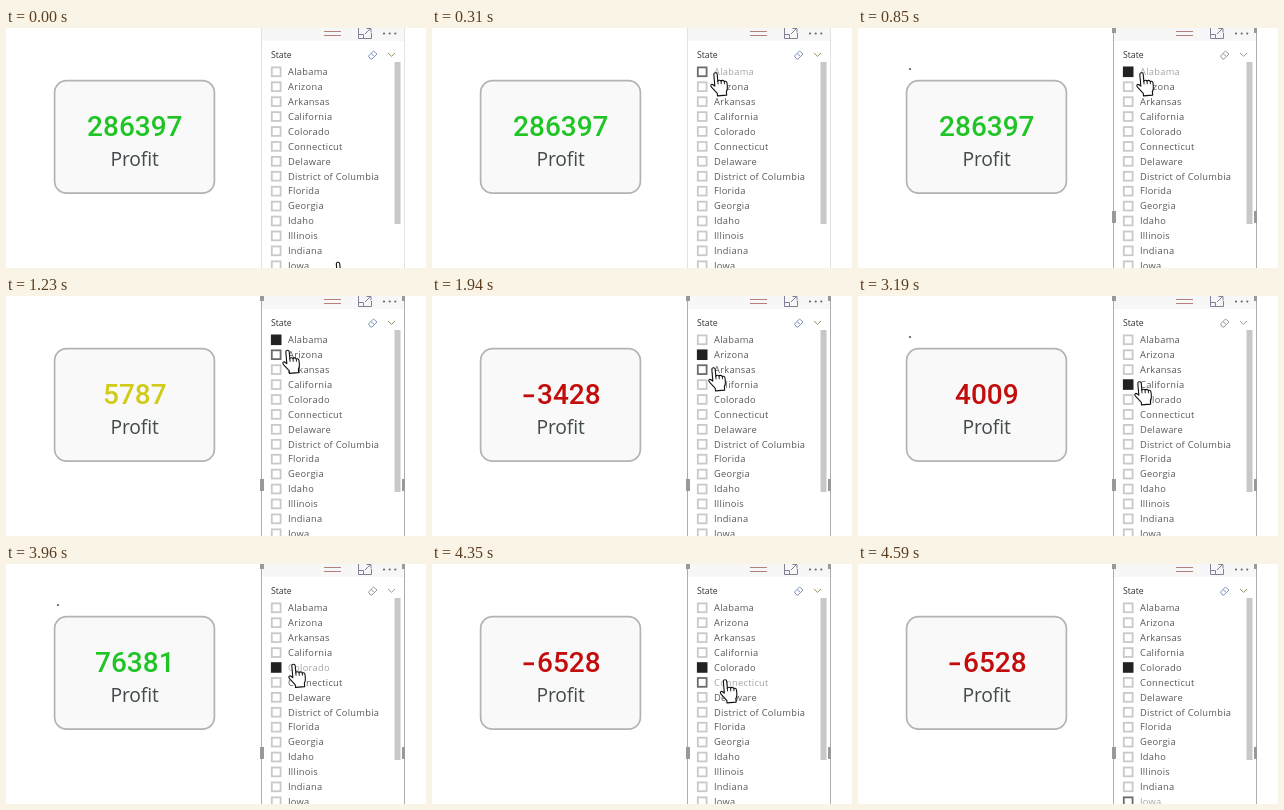
Recreate the animation shown at these times as an HTML page. Size 420 by 240 pixels, loop 4.83 s.

```html
<!DOCTYPE html>
<html lang="en">
<head>
<meta charset="utf-8">
<title>Profit by state</title>
<style>
  html, body { margin: 0; width: 100%; height: 100%; overflow: hidden; background: #fff; }
  svg { display: block; width: 420px; height: 240px; }
  text { font-family: "Open Sans", "Noto Sans", sans-serif; }
  .value { font: 500 28px Roboto, sans-serif; text-anchor: middle; }
  .label { font-size: 19.3px; letter-spacing: -.15px; fill: #434b4c; text-anchor: middle; }
  .title { font-size: 8.7px; fill: #333; }
  .row text { font-size: 9.3px; letter-spacing: .28px; fill: #585858; }
  .row rect { fill: #fff; stroke: #c9c9c9; stroke-width: 1.8; }
  .row.hover rect { stroke: #6c6c6c; }
  .row.checked rect { fill: #222; stroke: #222; }
  .row.muted text { fill: #a5a5a5; }
  .frame { stroke: #e2e2e2; }
  .selected .frame { stroke: #adadad; }
  .handles { fill: #999; visibility: hidden; }
  .selected .handles { visibility: visible; }
  .eraser { stroke: #7f97bd; }
  .chevron { stroke: #929262; }
  .busy .eraser, .busy .chevron { stroke: #999; }
  .spinner { fill: #555; visibility: hidden; }
  .busy .spinner { visibility: visible; }
</style>
</head>
<body>
<svg id="stage" viewBox="0 0 420 240">
  <circle class="spinner" cx="52" cy="41" r="1.1"/>
  <rect x="48.6" y="52.6" width="159.8" height="112.6" rx="12" fill="#f9f9f9" stroke="#b3b3b3" stroke-width="1.7"/>
  <g id="amount">
    <rect id="minus" x="91.5" y="98.4" width="10.5" height="2.8"/>
    <text id="digits" class="value" y="108"></text>
  </g>
  <text class="label" x="128.6" y="138">Profit</text>

  <rect x="256" width="143" height="13" fill="#f7f7f7"/>
  <path class="frame" d="M255.5 0V240M398.5 0V240"/>
  <path class="handles" d="M254 0h4v5h-4zM396 0h3v5h-3zM254 183h4v12h-4zM396 183h3v12h-3z"/>
  <path d="M318 3.5h17M318 7.5h17" stroke="#b57f7b"/>
  <path d="M352.5 0V10.5H365.5V5M352.5 6.5h5v4M359 6l5.5-5.5M360.5 .5h4.5v4" fill="none" stroke="#80809a"/>
  <g fill="#666"><circle cx="378" cy="5.5" r="1.1"/><circle cx="383.7" cy="5.5" r="1.1"/><circle cx="389.3" cy="5.5" r="1.1"/></g>
  <text class="title" x="265" y="30">State</text>
  <path class="eraser" d="M362.5 28l5-5 3.5 3-5 5h-1.5zM365 25.5l3.5 3" fill="none"/>
  <path class="chevron" d="M382 25l3.5 3.3 3.5-3.3" fill="none"/>
  <g id="rows"></g>
  <rect x="388.5" y="34" width="6" height="162" fill="#c8c8c8"/>
  <g id="cursor" stroke="#111" stroke-width="1.1" stroke-linejoin="round">
    <path fill="#fff" d="M-1.8 13V1.5a1.7 1.7 0 0 1 3.4 0V8.5q0-1 1.6-1t1.6 1.2q.4-.9 1.7-.7t1.5 1.4q.4-.6 1.4-.3 1.2.4 1.2 1.8V15q0 2.5-1.4 4.5V23H0V20.5L-5 14q-1.4-2-.2-2.8 1.2-.7 3.4 1.8z"/>
    <path d="M1.6 8v3.5M4.8 8.7v3M8 9.4v2.5" stroke-width=".9"/>
  </g>
</svg>
<script>
const LOOP = 4830, ROW_STEP = 14.92, FIRST_ROW = 43.8, BUSY_TIME = 80;
const GREEN = '#1fc525', YELLOW = '#d1cb1c', RED = '#c30c0c';
const states = ['Alabama', 'Arizona', 'Arkansas', 'California', 'Colorado', 'Connecticut', 'Delaware',
  'District of Columbia', 'Florida', 'Georgia', 'Idaho', 'Illinois', 'Indiana', 'Iowa'];

// [time, x, y] of the fingertip
const moves = [
  [0, 332, 234.5], [70, 322, 205], [150, 306, 148], [230, 292, 85], [310, 283.5, 45],
  [1000, 282.5, 50], [1070, 280, 54], [1230, 281.5, 54.5],
  [1780, 281.5, 61], [1860, 281.5, 67], [1940, 281.5, 72],
  [2560, 281.5, 80], [2630, 281.5, 86],
  [3340, 285, 95], [3420, 287.5, 100.5],
  [4280, 293, 116], [4360, 303, 150], [4430, 315, 185], [4510, 326, 218], [4590, 333, 246]
];
// [time, checked row, profit, colour]
const clicks = [
  [0, -1, 286397, GREEN], [850, 0, 5787, YELLOW], [1620, 1, -3428, RED],
  [2480, 2, 4009, RED], [3190, 3, 76381, GREEN], [3960, 4, -6528, RED]
];

const el = id => document.getElementById(id);
const lastIndex = (track, t) => track.findLastIndex(step => step[0] <= t);

el('rows').innerHTML = states.map((name, i) => {
  const y = FIRST_ROW + i * ROW_STEP;
  return `<g class="row"><rect x="265.8" y="${y - 4.4}" width="8.8" height="8.8"/><text x="282" y="${y + 3.3}">${name}</text></g>`;
}).join('');
const rows = [...el('rows').children];

function showProfit(profit, colour) {
  const negative = profit < 0;
  el('amount').setAttribute('fill', colour);
  el('minus').style.visibility = negative ? 'visible' : 'hidden';
  el('digits').setAttribute('x', negative ? 136.8 : 128.8);
  el('digits').textContent = Math.abs(profit);
}

function draw(t) {
  const [, x, y] = moves[lastIndex(moves, t)];
  const current = lastIndex(clicks, t);
  const [clickTime, checked] = clicks[current];
  const busy = current > 0 && t < clickTime + BUSY_TIME;
  const [, , profit, colour] = clicks[busy ? current - 1 : current];
  const hover = t < 70 ? -1 : Math.min(states.length - 1, Math.round((y - FIRST_ROW) / ROW_STEP));
  const fades = t < 1000 || t >= 3420;

  el('cursor').setAttribute('transform', `translate(${x} ${y}) rotate(-5)`);
  el('stage').classList.toggle('selected', current > 0);
  el('stage').classList.toggle('busy', busy);
  showProfit(profit, colour);
  rows.forEach((row, i) => {
    row.classList.toggle('checked', i === checked);
    row.classList.toggle('hover', i === hover);
    row.classList.toggle('muted', i === hover && fades);
  });
}

const start = performance.now();
function tick() {
  draw((performance.now() - start) % LOOP);
  requestAnimationFrame(tick);
}
tick();
</script>
</body>
</html>
```
